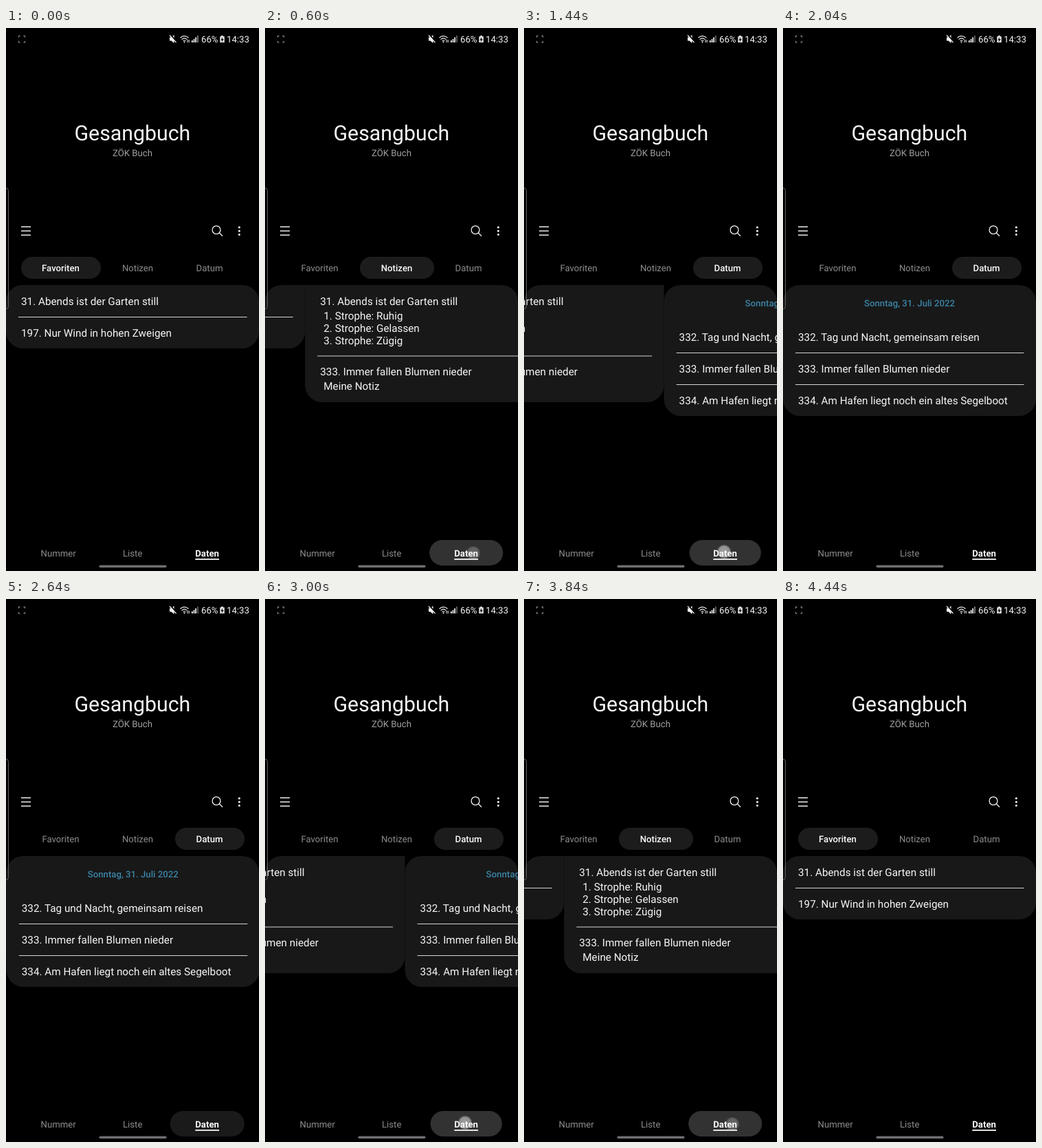
Animation of 368x788 px, one loop 4560 ms. Source, as an HTML page:

```html
<!DOCTYPE html>
<html lang="de">
<head>
<meta charset="utf-8">
<title>Gesangbuch</title>
<style>
  html, body { margin: 0; width: 100%; height: 100%; overflow: hidden; background: #000; }
  svg { display: block; width: 100%; height: 100%; font: 13.2px Roboto, sans-serif; fill: #f6f6f6; text-rendering: geometricPrecision; }
  .mid { text-anchor: middle; }
  .dim { fill: #8c8c8c; }
  .strong { font-weight: 500; fill: #fafafa; }
  .item { font-size: 15.27px; }
  .line { fill: none; stroke: #f2f2f2; stroke-width: 1.3; }
  .rule { stroke: #d4d4d4; stroke-width: 1.1; }
</style>
</head>
<body>
<svg viewBox="0 0 368 788">
  <defs>
    <clipPath id="pagerClip"><rect y="373" width="368" height="260" rx="24"/></clipPath>
    <radialGradient id="touchFill">
      <stop offset="0" stop-color="#fff" stop-opacity=".7"/>
      <stop offset=".75" stop-color="#eee" stop-opacity=".65"/>
      <stop offset="1" stop-color="#ccc" stop-opacity=".1"/>
    </radialGradient>
  </defs>
  <rect width="368" height="788" fill="#000"/>

  <!-- status bar -->
  <path class="line" style="stroke:#8c8c8c;stroke-width:1.1" d="M18.500 13.700v-2.200h2.200M25.300 11.500h2.200v2.200M27.500 18.800v2.200h-2.200M20.700 21h-2.200v-2.200"/>
  <path d="M238 13.500h2.500l4-3.500v12l-4-3.500h-2.500z"/>
  <path class="line" style="stroke:#000;stroke-width:2.600" d="M239 10l9 10"/>
  <path class="line" style="stroke-width:1.200" d="M238 10.500l9.500 10.500"/>
  <g class="line" style="stroke-width:1.200">
    <path d="M253.500 14.200q6-5 12 0M255.500 16.600q4-3.400 8 0M257.600 18.800q1.900-1.600 3.800 0"/>
    <path d="M264 17v4M266.200 17v4" style="stroke-width:1"/>
  </g>
  <circle cx="259.500" cy="20.500" r="1"/>
  <path d="M270 18h1.700v3h-1.700zM272.700 16h1.700v5h-1.700zM275.300 13.500h1.700v7.500h-1.700z"/>
  <rect id="lastBar" x="278" y="11" width="1.800" height="10"/>
  <text x="284" y="20.500">66%</text>
  <path d="M313 11h3v1.300h1.800v8.700h-6.600v-8.700h1.800z" fill="#ddd"/>
  <path d="M315.200 13.200l-2.800 4.200h1.800l-.5 3 3-4.400h-1.900z" fill="#000"/>
  <text x="321" y="20.500">14:33</text>

  <!-- header -->
  <text class="mid" x="183.900" y="163" font-size="30.300">Gesangbuch</text>
  <text class="mid" x="184" y="186.400" style="fill:#a0a0a0">ZÖK Buch</text>
  <path class="line" d="M22 288.500h14M22 294.500h14M22 300.500h14"/>
  <circle class="line" cx="306" cy="293" r="5.900"/>
  <path class="line" d="M310.300 297.300l4.700 4.700"/>
  <circle cx="339.300" cy="289.300" r="1.500"/><circle cx="339.300" cy="294.500" r="1.500"/><circle cx="339.300" cy="299.700" r="1.500"/>

  <rect id="tabPill" y="332" height="32" rx="16" fill="#1c1c1c"/>
  <g id="tabs"></g>
  <g clip-path="url(#pagerClip)"><g id="pager"></g></g>
  <path d="M-2 232.500h3q2.500 0 2.500 4v167q0 4-2.500 4h-3" fill="none" stroke="#626262" stroke-width="1"/>

  <!-- bottom navigation -->
  <rect id="navPill" y="743" height="37" rx="18.500" fill="#323232"/>
  <text class="mid dim" x="76.200" y="766.500">Nummer</text>
  <text class="mid dim" x="184.200" y="766.500">Liste</text>
  <text class="mid strong" x="292.600" y="766.500" style="font-weight:700">Daten</text>
  <rect x="275.300" y="770" width="34.700" height="1.800"/>
  <circle id="touch" r="10.500" fill="url(#touchFill)"/>
  <rect x="135.500" y="779.500" width="98" height="3.500" rx="1.750" fill="#6e6e6e"/>
</svg>
<script>
const LOOP = 4560, TICK = 120, WIDTH = 368, SCROLL = 600;
const $ = id => document.getElementById(id);
const clamp = v => Math.max(0, Math.min(1, v));

const tabs = [
  { name: 'Favoriten', x: 22, w: 116 },
  { name: 'Notizen', x: 138, w: 108 },
  { name: 'Datum', x: 246, w: 101 }
];
const taps = [
  { time: 415, x: 303, y: 762 },
  { time: 1373, x: 291, y: 760 }
];
// Text rows: [x, baseline, text]
const pages = [
  { bottom: 465, rules: [419.5], rows: [
    [22, 402, '31. Abends ist der Garten still'],
    [22, 447.9, '197. Nur Wind in hohen Zweigen']] },
  { bottom: 543, rules: [476], rows: [
    [22, 402, '31. Abends ist der Garten still'],
    [27, 422.7, '1. Strophe: Ruhig'],
    [27, 440.7, '2. Strophe: Gelassen'],
    [27, 458.7, '3. Strophe: Zügig'],
    [22, 504.4, '333. Immer fallen Blumen nieder'],
    [27, 525.2, 'Meine Notiz']] },
  { bottom: 563, rules: [471.5, 517.5], date: 'Sonntag, 31. Juli 2022', rows: [
    [22, 454.1, '332. Tag und Nacht, gemeinsam reisen'],
    [22, 500, '333. Immer fallen Blumen nieder'],
    [22, 545.9, '334. Am Hafen liegt noch ein altes Segelboot']] }
];

$('tabs').innerHTML = tabs.map(({ name, x, w }) =>
  `<text x="${x + w / 2 - .5}" y="353.1">${name}</text>`).join('');

// Only the dated card has rounded top corners of its own.
function cardPath(bottom, top) {
  const r = 24.5;
  return `M${top} 373H${WIDTH - top}a${top} ${top} 0 0 1 ${top} ${top}V${bottom - r}` +
    `a${r} ${r} 0 0 1 ${-r} ${r}H${r}a${r} ${r} 0 0 1 ${-r} ${-r}V${373 + top}a${top} ${top} 0 0 1 ${top} ${-top}z`;
}

$('pager').innerHTML = pages.map(({ bottom, rules, date, rows }, i) =>
  `<g transform="translate(${i * WIDTH})">
    <path d="${cardPath(bottom, date ? 24 : 0)}" fill="#181818"/>` +
    rules.map(y => `<path class="rule" d="M18 ${y}H350.500"/>`).join('') +
    (date ? `<text class="mid" x="184" y="404" style="font-weight:500;fill:#3b84a6">${date}</text>` : '') +
    rows.map(([x, y, text]) => `<text class="item" x="${x}" y="${y}">${text}</text>`).join('') +
  '</g>').join('');

const easeOut = u => 1 - (1 - clamp(u)) ** 5;

function setAttrs(id, attrs) {
  for (const key in attrs) $(id).setAttribute(key, attrs[key]);
}

// Plays forward, rests, then runs the same steps backwards.
function poseTime(time) {
  const step = Math.floor(time / TICK) * TICK;
  return Math.max(0, step < 2520 ? Math.min(step, 2040) : 4440 - step);
}

function draw(t) {
  const scroll = taps.reduce((sum, tap) => sum + easeOut((t - tap.time) / SCROLL), 0);
  setAttrs('pager', { transform: `translate(${-scroll * WIDTH})` });

  const active = taps.filter(tap => t > tap.time).length;
  setAttrs('tabPill', { x: tabs[active].x, width: tabs[active].w });
  [...$('tabs').children].forEach((el, i) =>
    el.setAttribute('class', i === active ? 'mid strong' : 'mid dim'));

  const tap = t < 1200 ? taps[0] : taps[1];
  const since = t - tap.time;
  const width = Math.min(108, 102.4 + since * .025);
  setAttrs('navPill', {
    x: 292.7 - width / 2, width,
    opacity: clamp(Math.min((since + 110) / 110, (665 - since) / 450))
  });
  setAttrs('touch', {
    cx: tap.x, cy: tap.y,
    opacity: since < -80 ? 0 : clamp(1 - Math.max(0, since) / 300)
  });
  setAttrs('lastBar', { opacity: t < TICK ? .55 : .4 });
}

const start = performance.now();
function frame() {
  draw(poseTime((performance.now() - start) % LOOP));
  requestAnimationFrame(frame);
}
frame();
</script>
</body>
</html>
```
